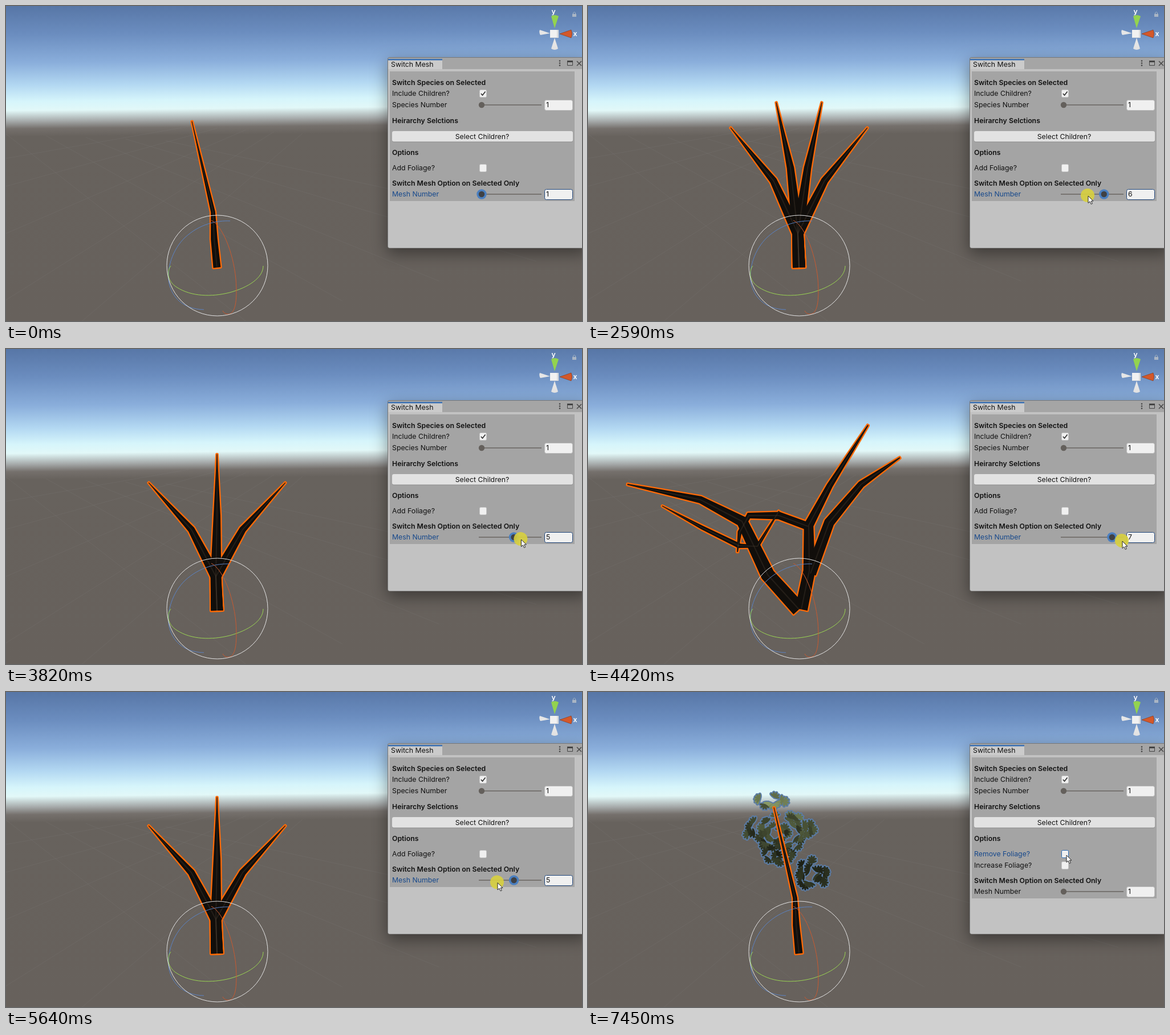
Recreate the animation shown at these times as an HTML page with a canvas. Size 1010 px wide and 554 px high, loop 8 s.

```html
<!DOCTYPE html>
<html lang="en">
<head>
<meta charset="utf-8">
<title>Switch Mesh</title>
<style>
html, body { margin: 0; width: 100%; height: 100%; overflow: hidden; background: #67615c; }
canvas { display: block; }
</style>
</head>
<body>
<canvas width="1010" height="554"></canvas>
<script>
const ctx = document.querySelector('canvas').getContext('2d');
const LOOP = 8000, STEP = 201.5, LEAD = 32;
const GRAB = 9, RELEASE = 31, CLICK = 36, FOLIAGE = 37;

// Branch: start width, end width, key points from root to tip.
const modelled = {
  1: [[13, 1, '370,460 365,410 363,362 326,203']],
  3: [[18, 1, '370,460 369,385 388,345 392,309 375,243'],
      [18, 5, '368,395 367,350 379,316']],
  7: [[26, 2, '370,458 315,397 270,303 197,265 69,238'],
      [22, 2, '374,458 388,390 387,310 424,240 491,134'],
      [20, 2, '390,395 423,305 479,238 547,191'],
      [14, 2, '386,312 335,293 282,293 266,322 262,357'],
      [9, 1, '265,346 200,314 130,276'],
      [8, 2, '262,346 297,347 335,285']],
  8: [[50, 20, '370,468 366,372 370,240'],
      [22, 12, '370,240 360,212 366,180 383,152'],
      [10, 4, '383,155 372,136 366,107'],
      [13, 13, '378,240 394,195 384,152 412,138 452,123'],
      [20, 7, '368,236 395,222 470,216 560,180 605,171 672,112 704,59'],
      [28, 16, '350,375 294,315 299,215 275,103 104,-4'],
      [12, 18, '303,220 330,250 338,300 355,350'],
      [26, 16, '296,322 250,342 213,385 207,402 265,403 340,378'],
      [18, 12, '330,380 385,360 440,325 485,288 504,245']]
};

// The other meshes fan out from the trunk: higher numbers are taller and have more limbs.
function fan(n) {
  const limbs = 1 + n / 2 | 0;
  return Array.from({ length: limbs }, (_, i) => {
    const u = i / (limbs - 1) * 2 - 1, top = 290 - 21 * n + 50 * u * u;
    return [16 + n, 1, `370,460 368,400 ${370 + u * 45},${(400 + top) / 2} ${370 + u * 120},${top}`];
  });
}

// Cursor path: step, x, y
const cursorKeys = [
  [2, 892, 179], [5, 791, 355], [7, 836, 333], [9, 836, 331], [12, 902, 333], [14, 850, 333],
  [16, 879, 331], [21, 918, 336], [22, 936, 337], [25, 930, 333], [26, 908, 331],
  [30, 814, 338], [31, 810, 339], [34, 838, 286]
];

function cursorAt(step) {
  const i = cursorKeys.findIndex(k => k[0] >= step);
  if (i < 0) return cursorKeys.at(-1).slice(1);
  const b = cursorKeys[i], a = cursorKeys[Math.max(0, i - 1)];
  const t = a === b ? 0 : (step - a[0]) / (b[0] - a[0]);
  return [a[1] + (b[1] - a[1]) * t, a[2] + (b[2] - a[2]) * t];
}

// The slider follows the cursor one step late.
function meshAt(step) {
  if (step <= GRAB || step > RELEASE) return 1;
  const [x] = cursorAt(step - 1);
  return Math.min(8, Math.max(1, Math.round((x - 834) / 14.15 + 1)));
}

function rect(x, y, w, h, fill, radius = 0, stroke) {
  ctx.beginPath();
  ctx.roundRect(x, y, w, h, radius);
  ctx.fillStyle = fill;
  ctx.fill();
  if (stroke) { ctx.strokeStyle = stroke; ctx.lineWidth = 1; ctx.stroke(); }
}

function disc(x, y, r, fill) {
  ctx.beginPath();
  ctx.arc(x, y, r, 0, 7);
  ctx.fillStyle = fill;
  ctx.fill();
}

function path(d, stroke, width = 1, fill) {
  const p = new Path2D(d);
  if (fill) { ctx.fillStyle = fill; ctx.fill(p); }
  if (stroke) { ctx.strokeStyle = stroke; ctx.lineWidth = width; ctx.stroke(p); }
}

function text(s, x, y, { bold, color = '#111', align = 'left' } = {}) {
  ctx.font = `${bold ? 600 : 400} 12.3px Inter, sans-serif`;
  ctx.fillStyle = color;
  ctx.textAlign = align;
  ctx.fillText(s, x, y + 4.2);
}

function drawScene() {
  const g = ctx.createLinearGradient(0, 0, 5.5, 554);
  [[0, '#5776a6'], [50, '#6b8dbf'], [100, '#8aaedb'], [140, '#b3d8f2'], [168, '#d6f5fb'],
   [184, '#e2f8f8'], [203, '#a5a9a9'], [216, '#75706c'], [230, '#67625d'], [554, '#67615c']]
    .forEach(([y, c]) => g.addColorStop(y / 554, c));
  rect(0, 0, 1010, 554, g);
  for (let i = 0; i < 5; i++) {
    path(`M0 ${268 + i * i * 17 + i * 32}L${320 + i * 50} ${212 + i * 3}`, 'rgba(140,138,135,.16)');
    path(`M${i * 70} ${225 + i * 3}L${420 + i * 170} ${554 - i * 35}`, 'rgba(140,138,135,.16)');
  }
}

function drawAxes() {
  path('M956 18Q962 14 969 18L962 39Z', 0, 0, '#93d34f');
  path('M971 49L991 42Q994 49 991 56Z', '#8a3a1c', .7, '#d4582a');
  path('M936 42Q934 46 937 51L954 48Z', 0, 0, '#e6e6e6');
  path('M956 75Q962 79 968 75L962 56Z', 0, 0, '#e6e6e6');
  rect(954, 42, 15, 14, '#d9dbdd');
  rect(954, 42, 12, 13, '#f1f1f1');
  text('y', 960, 10, { bold: true, color: '#fff', align: 'center' });
  text('x', 998, 49, { bold: true, color: '#fff', align: 'center' });
  path('M994.5 14V12Q996.5 9 998.5 12V14', '#a9b5c4');
  rect(993, 14, 7, 5, '#a9b5c4');
}

function branchPath([startWidth, endWidth, list]) {
  const points = list.split(' ').map(p => p.split(',').map(Number));
  const last = points.length - 1, left = [], right = [];
  points.forEach(([x, y], i) => {
    const [ax, ay] = points[Math.max(0, i - 1)], [bx, by] = points[Math.min(last, i + 1)];
    const angle = Math.atan2(by - ay, bx - ax);
    const half = (startWidth + (endWidth - startWidth) * (i / last) ** 2) / 2;
    const dx = -Math.sin(angle) * half, dy = Math.cos(angle) * half;
    left.push([x + dx, y + dy]);
    right.unshift([x - dx, y - dy]);
  });
  return { outline: `M${left.concat(right).join('L')}Z`, grain: `M${points.join('L')}` };
}

function drawMesh(n) {
  const parts = (modelled[n] || fan(n)).map(branchPath);
  ctx.lineJoin = 'round';
  parts.forEach(p => path(p.outline, '#ff6a06', 4.6));
  parts.forEach(p => path(p.outline, 0, 0, '#110e0b'));
  parts.forEach(p => path(p.grain, 'rgba(72,62,50,.35)', n === 8 ? 5 : 2));
}

function drawFoliage() {
  let seed = 11;
  const rnd = () => (seed = seed * 16807 % 2147483647) / 2147483647;
  const leaves = [];
  // Clumps: centre and radii. Leaves darken away from the sky.
  for (const [cx, cy, rx, ry] of [[319, 190, 28, 10], [337, 246, 58, 30], [330, 288, 30, 13], [395, 320, 26, 26]]) {
    for (let i = rx * ry / 28; i > 0; i--) {
      const a = rnd() * 6.28, r = Math.sqrt(rnd());
      const x = cx + Math.cos(a) * rx * r, y = cy + Math.sin(a) * ry * r;
      const light = (13 + 50 * Math.exp((175 - y) / 45)) * (.6 + rnd() * .7);
      for (let k = -2; k <= 2; k++) {
        const t = a + k * .65;
        leaves.push([x + Math.cos(t) * 4, y + Math.sin(t) * 4, t, `hsl(80 20% ${light}%)`]);
      }
    }
  }
  const shape = ([x, y, a]) => {
    ctx.beginPath();
    ctx.ellipse(x, y, 5, 1.8, a, 0, 7);
  };
  ctx.strokeStyle = '#5b7ca6';
  ctx.lineWidth = 4;
  leaves.forEach(l => { shape(l); ctx.stroke(); });
  leaves.forEach(l => { shape(l); ctx.fillStyle = l[3]; ctx.fill(); });
}

function drawRotator() {
  path('M393 378C370 377 340 383 314 407C292 428 281 462 286 488C291 510 308 533 347 534', '#5b83c4');
  path('M289 457C282 466 282 484 300 495C325 511 360 512 392 504C425 495 451 478 451 457', '#9bd553');
  path('M360 377C378 385 398 430 403 480C406 520 402 542 389 542Q382 541 380 536', '#c95a30');
  ctx.beginPath();
  ctx.arc(370.5, 456.5, 88.5, 0, 7);
  ctx.strokeStyle = '#e4e4e4';
  ctx.stroke();
}

function checkbox(label, y, checked, focused) {
  text(label, 677, y, { color: focused ? '#17498c' : '#111' });
  rect(830.5, y - 6.5, 12, 13, '#f0f0f0', 2, focused ? '#2b6cb5' : '#c4c4c4');
  if (checked) path(`M833 ${y}L835.5 ${y + 3}L840.5 ${y - 3.5}`, '#333', 1.7);
}

function slider(label, y, value, focused) {
  const x = 834 + (value - 1) * 14.15;
  text(label, 677, y, { color: focused ? '#17498c' : '#111' });
  rect(829, y - 1, 110, 2, '#777471');
  if (focused) disc(x, y, 8.7, '#4a7fc0');
  disc(x, y, 5.2, focused ? '#3f4145' : '#64605c');
  rect(944.5, y - 8.5, 49, 18, '#f0f0f0', 3, focused ? '#23487c' : '#bcbcbc');
  text(value, 947, y);
}

function drawPanel(value, foliage) {
  ctx.save();
  ctx.shadowColor = 'rgba(0,0,0,.42)';
  ctx.shadowBlur = 28;
  ctx.shadowOffsetY = 9;
  rect(669, 90, 350, 336, '#777', 4);
  ctx.restore();
  rect(670, 91, 350, 334.5, '#c2c2c2', 3);
  rect(670, 91, 350, 20, '#a5a5a5', [3, 0, 0, 0]);
  rect(670, 93, 95, 18, '#cbcbcb');
  rect(670, 93, 95, 2.5, '#3b71b3');
  text('Switch Mesh', 675, 103);
  [96.5, 100.5, 104.5].forEach(y => disc(971, y, 1.3, '#444'));
  rect(984.5, 96.5, 9, 8, '#a5a5a5', 0, '#444');
  rect(984, 96, 10, 3, '#444');
  path('M1001 97L1009 105M1009 97L1001 105', '#444', 1.4);

  const shift = foliage ? 20 : 0;
  rect(673, 115, 324, 228 + shift, '#a4a4a4');
  const head = (s, y) => text(s, 677, y, { bold: true });
  head('Switch Species on Selected', 135);
  checkbox('Include Children?', 154, true);
  slider('Species Number', 174, 1);
  head('Heirarchy Selctions', 202);
  rect(677, 220, 317, 19.5, '#8c8c8c', 3);
  rect(677, 220, 317, 18.5, '#e2e2e2', 3);
  text('Select Children?', 835, 230, { align: 'center' });
  head('Options', 258);
  checkbox(foliage ? 'Remove Foliage?' : 'Add Foliage?', 285, false, foliage);
  if (foliage) checkbox('Increase Foliage?', 305);
  head('Switch Mesh Option on Selected Only', 312 + shift);
  slider('Mesh Number', 331 + shift, value, !foliage);
}

function drawCursor(step) {
  const [x, y] = cursorAt(step);
  if (step === GRAB || step === GRAB - 1) {
    disc(x, y, 10.5, 'rgba(126,190,92,.9)');
    ctx.strokeStyle = '#d0d13e';
    ctx.lineWidth = 2.6;
    ctx.stroke();
    disc(x, y, 4, '#8c9a35');
    return;
  }
  const pressed = step > GRAB && step <= RELEASE || step === CLICK;
  if (pressed) disc(x, y, 12, 'rgba(216,208,62,.9)');
  ctx.save();
  ctx.translate(x + 1, y + 1);
  path('M0 0V12.5L3 9.8L5.2 14.5L7.3 13.5L5.2 9H9Z', '#222', 1, '#fff');
  ctx.restore();
}

function draw(step) {
  const mesh = meshAt(step), foliage = step >= FOLIAGE;
  drawScene();
  drawAxes();
  if (foliage) drawFoliage();
  drawMesh(mesh);
  drawRotator();
  drawPanel(mesh, foliage);
  if (step >= cursorKeys[0][0]) drawCursor(step);
}

let shown;
function tick(now) {
  const step = Math.floor((now % LOOP + LEAD) / STEP);
  if (step !== shown) draw(shown = step);
  requestAnimationFrame(tick);
}
tick(performance.now());
</script>
</body>
</html>
```
